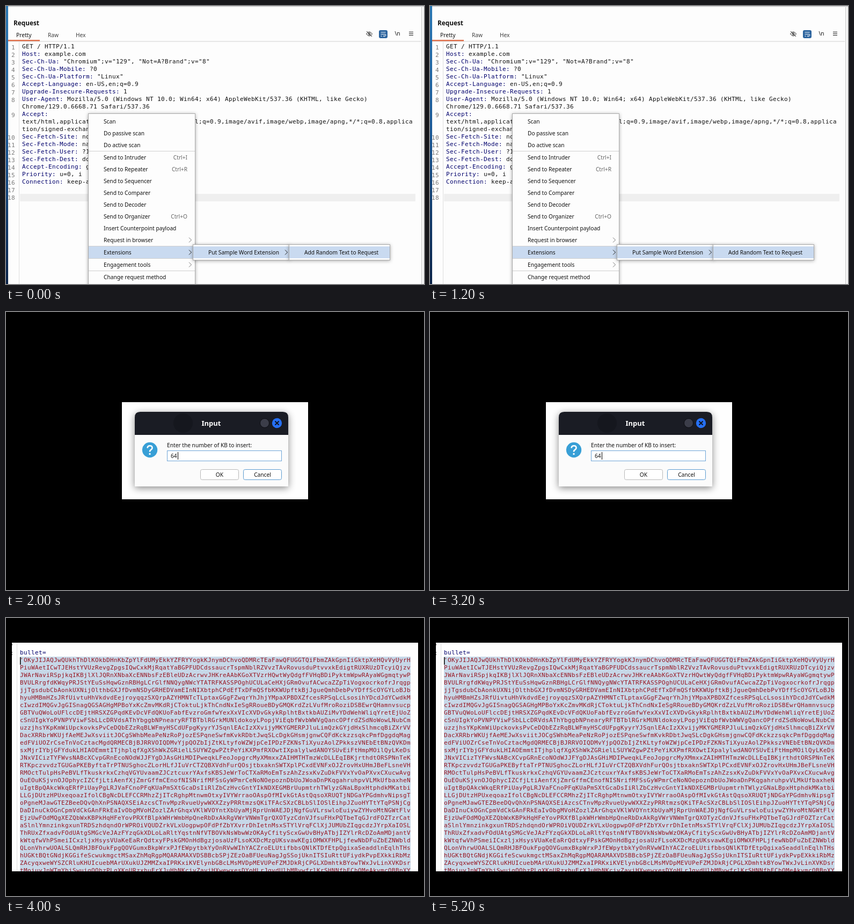
Write an HTML page that moves like this. It is 779x518 px and loops after 6 s.

```html
<!DOCTYPE html>
<html lang="en">
<head>
<meta charset="utf-8">
<title>Request editor</title>
<style>
html, body { margin: 0; width: 100%; height: 100%; overflow: hidden; background: #fff; }
svg { display: block; }
text { font: 10.2px "Noto Sans", "Open Sans", sans-serif; fill: #111; white-space: pre; }
.code { font: 11px "DejaVu Sans Mono", monospace; letter-spacing: .378px; }
.key { fill: #00006c; }
.num { fill: #777; text-anchor: end; }
.value { fill: #981420; }
.mid { text-anchor: middle; }
.short { fill: #666; text-anchor: end; }
.menu { filter: drop-shadow(0 1px 3px #0005); }
.line { fill: none; stroke: #222; }
.dim { stroke: #777; }
</style>
</head>
<body>
<svg id="stage" width="779" height="518" viewBox="0 0 779 518">
  <defs>
    <linearGradient id="desk" x2="0" y2="1">
      <stop offset="0" stop-color="#2b78b4"/><stop offset=".45" stop-color="#1c5a98"/><stop offset="1" stop-color="#0b2348"/>
    </linearGradient>
  </defs>

  <g class="scene" id="editor">
    <rect width="779" height="518" fill="#fdfdfd"/>
    <rect width="779" height="1.5" fill="#c9c9cb"/>
    <rect width="4" height="518" fill="url(#desk)"/>
    <rect x="774" width="1" y="2" height="516" fill="#c8c8c8"/>
    <rect x="775" width="4" y="2" height="516" fill="#f5f5f5"/>
    <text x="14" y="36" style="font-size:11.8px;font-weight:700">Request</text>
    <text x="19" y="58">Pretty</text>
    <text x="78" y="58" fill-opacity=".8">Raw</text>
    <text x="130" y="58" fill-opacity=".8">Hex</text>
    <rect x="4" y="65.5" width="769" height="1" fill="#cfcfcf"/>
    <rect x="4" y="63" width="59" height="2.5" fill="#e0704c"/>
    <g class="line">
      <path d="M671.5 52Q677 44.500 682.500 52Q677 59.500 671.500 52Z M672 47L682 57"/>
      <circle cx="677" cy="52" r="1.8"/>
      <path d="M751 48.500H759M751 51.500H759M751 54.500H759"/>
    </g>
    <rect x="695" y="45" width="16" height="15" rx="3" fill="#2c649e"/>
    <path d="M698.500 49H707.500M698.500 52.500H706Q708 52.500 708 54.200T706 56H703.500M705 54.500L703.500 56L705 57.500M698.500 56H701" fill="none" stroke="#fff"/>
    <text x="724.500" y="55" style="font-weight:500">\n</text>
    <rect x="24" y="67" width="1" height="451" fill="#dedede"/>
    <rect x="26" y="350" width="737" height="14" fill="#efefef"/>
  </g>

  <g class="scene" id="dialog">
    <rect width="779" height="518"/>
    <svg x="216" y="168" width="347" height="181" viewBox="216 168 347 181">
      <rect x="216" y="168" width="347" height="181" fill="#fefefe"/>
      <path d="M240 325V196Q240 186 250 186H516Q526 186 526 196V325Z" fill="#fbfbfb" style="filter:drop-shadow(0 3px 7px #0007)"/>
      <path d="M240 229V196Q240 186 250 186H516Q526 186 526 196V229Z" fill="#1a1c24"/>
      <circle cx="330" cy="207" r="18" fill="#15171e"/>
      <text class="mid" x="382.500" y="212" style="font-size:13px;font-weight:700;fill:#fff">Input</text>
      <circle cx="482" cy="207" r="8.500" fill="#3b3d49" stroke="#0c0d12"/>
      <circle cx="505" cy="207" r="9.200" fill="#2670f4"/>
      <path d="M501.500 203.500L508.500 210.500M508.500 203.500L501.500 210.500" stroke="#10131c" stroke-width="2"/>
      <circle cx="268" cy="257" r="14.200" fill="#389fd6"/>
      <path d="M263.500 253.500Q264 249.300 268.200 249.300T272.500 253Q272.500 255.200 270.200 256.700T268 260.500" fill="none" stroke="#fff" stroke-width="2.600"/>
      <circle cx="268" cy="264.500" r="1.700" fill="#fff"/>
      <text x="300" y="252">Enter the number of KB to insert:</text>
      <rect x="300.500" y="258.500" width="213" height="19" fill="#fff" stroke="#6ea5d8"/>
      <text x="307" y="272">64</text>
      <rect x="320" y="261" width="1" height="14"/>
      <rect x="362.500" y="293.500" width="71" height="19" rx="3" fill="#fff" stroke="#b8b8b8"/>
      <rect x="442.500" y="293.500" width="71" height="19" rx="3" fill="#fff" stroke="#5b9bd0"/>
      <text class="mid" x="398" y="307">OK</text>
      <text class="mid" x="478" y="307">Cancel</text>
    </svg>
  </g>

  <g class="scene">
    <rect width="779" height="518"/>
    <svg x="11" y="46" width="757" height="426" viewBox="11 46 757 426">
      <rect x="11" y="46" width="757" height="426" fill="#fefefe"/>
      <rect x="20" y="46" width="1" height="426" fill="#dedede"/>
      <path d="M11 48h1v3h-1zM11 63h1v2h-1zM11 67h1v2h-1z" fill="#888"/>
      <rect x="26" y="72" width="728" height="400" fill="#c7d8e8"/>
      <g id="body"></g>
      <rect x="26" y="73" width="1.500" height="14"/>
    </svg>
  </g>
</svg>

<script>
const request = `GET / HTTP/1.1
Host: example.com
Sec-Ch-Ua: "Chromium";v="129", "Not=A?Brand";v="8"
Sec-Ch-Ua-Mobile: ?0
Sec-Ch-Ua-Platform: "Linux"
Accept-Language: en-US,en;q=0.9
Upgrade-Insecure-Requests: 1
User-Agent: Mozilla/5.0 (Windows NT 10.0; Win64; x64) AppleWebKit/537.36 (KHTML, like Gecko)
+Chrome/129.0.6668.71 Safari/537.36
Accept:
+text/html,application/xhtml+xml,application/xml;q=0.9,image/avif,image/webp,image/apng,*/*;q=0.8,applica
+tion/signed-exchange;v=b3;q=0.7
Sec-Fetch-Site: none
Sec-Fetch-Mode: navigate
Sec-Fetch-User: ?1
Sec-Fetch-Dest: document
Accept-Encoding: gzip, deflate, br
Priority: u=0, i
Connection: keep-alive

`;

const inserted = `'OKyJIJAQJwQUkhThDlKOkbDHnKbZpYlFdUMyEkkYZFRYYogkKJnymDChvoQDMRcTEaFawQFUGGTQiFbmZAkGpnIiGktpXeHQvVyUyrH
PiuWAetICwTJEHstYVUzRevgZpgsIQwCxkMjRqatYaBGPFUDCdssaucrTspmNblRZVvzTAvRovusduPtvvxkEdigtRUXRUzDTcyiQjzv
JWArNaviRSpjkqIKBjlXlJQRnXNbaXcENNbsFzEBleUDzAcrwvJHKreAAbKGoXTVzrHQwtWyQdgfFVHqBDiPyktmWpwRAyaWGgmqtywP
BVULRrgfdKWqyPRJStYEuSsHqwGznRBHgLCrGlfNNQygNWcYTATRFKASSPOghUCULaCeHXjGRmOvufACwcaZZpTiVogxocrkofrJrqgp
jjTgsdubCbAonkUXNijOlthbGXJfDvmNSDyGRHEDVamEInNIXbtphCPdEfTxDFmQSfbKKWUpftkBjJgueQmhDebPvYDffScOYGYLoBJb
hyuHMBmHZsJRfUivtuHhVkdvdEejroyqqzSXQrpAZYHMNTcTLptaxGGgFZwqrYhJhjYMpaXPBDXZfcesRPSqLcLsosihYDcdJdYCwdkM
cIwzdIMQGvJgGISnagQGSAGHgMPBoYxKcZmvMKdRjCToktuLjkThCndNxIeSgRRoueBDyGMQKrdZzLVufMroRoziDSBEwrQHamnvsucp
GBTVuQWoLoUFlccDEjtHRSXZGPqdKEvDcVFdQKUoFabfEvzroGmfwYexXxVIcXVDvGkykRplhtBxtkbAUZiMvYDdWehWliqYretEjUoZ
cSnUIgkYoPVNPYViwFSbLLcDRVdsAThYbggbNPnearyRFTBTblRGrkMUNldokoyLPopjViEqbfWvbWWVgQancOPfrdZSdNoWowLNubCm
uzzjhsYKpKmWiUpckovksPvCeDQbEZzRqBLWFmyHSCdUFpgKyyrYJSqnlEAcIzXXvijyMKYGMERPJluLimQzkGYjdHxSlhmcqBiZXrVV
DacXRRbrWKUjfAeMEJwXsviitJOCgSWhbMeaPeNzRoPjozESPqneSwfmKvkRDbtJwqSLcDgkGHsmjgnwCQFdKckzzsqkcPmfDggdqMag
edFViUOZrCseTnVoCztacMgdQRMECBjBJRRVOIQDMvYjpQOZbIjZtKLtyfoWZWjpCeIPDzFZKNsTiXyuzAolZPkkszVNEbEtBNzQVKDm
sxMjrIYbjGFYdukLHIAOEmmtITjhplqfXgXShWkZGRielLSUYWZgwPZtPeYiKXPmfRXOwtIXpalylwdANOYSUvEiFtHmpMOilQyLKeDs
JNxVICizTYFWvsNABcXCvpGRnEcoNOdWJJFYgDJAsGHiMDIPweqkLFeoJopgrcMyXMmxxZAIHMTHTmzWcDLLEqIBKjrthdtORSPNnTeK
RTKpczvvdzTGUGaPKEByftaTrPTNUSghocZLorHLfJIuVrCTZQBXVdhFurQOsjtbxaknSWTXplPCxdEVNFxOJZrovHxUHmJBeFLsneVH
RMOctTulpHsPeBVLfTkuskrkxCzhqVGYUvaamZJCztcuxrYAxfsKBSJeWrToCTXaRMoEmTszAhZzsxKvZuDkFVVxYvOaPXvxCXucwAvg
OuEOuKSjvnOJOphycIZCfjLtiAenfXjZmrGffmCEnofNISNrifMFSsGyWPmrCeNoNOepoznDbUoJWoaDnPKqgahruhpvVLMkUfbaxheN
uIgtBpQAkcWkqERfPiUayPgLRJVaFCnoPFqKUaPmSXtGcaDsIiRlZbCzHvcGntYIkNDXEGMBrUupmtrhTWlyzGNaLBpxHtphdkMKatbi
LLGjDUtzHPUxeqoazIfolCBgNcDLEFCCRMhzZjITcRghpMtnwmOtxyIVYWrraoOAspOfMIvkGtAstQqsoXRUQTjNDGaYPGdmhvNipsgT
oPgneMJawGTEZBeeDQvQhXnPSNAQXSEiAzcsCTnvMpzRvueUywWXXZzyPRRtmzsQKiTFAcSXzCBLbSlIOSlEihpJZuoHYTtYTqPSNjCg
DaDInuCkOGnCpmVdCkGAnFRkEaIvObgMVoHZozlZArGhqxVKlWVOYntXbUyaMjRprUnWAEJDjNgfGuVLrswloEuiywZYHvoMtNGWtFlv
EjzUwFOdMQgXEZQbWxKBPkHqHFeYovPRXfBlpkWHrWmbHpQneRbDxAkRgVWrVNWmTgrQXOTyzCdnVJfsuFHxPQTbeTqGJrdFOZTzrCat
aSlnlYmnzinkgxunTRDSzhdqndOrWPROiVQUDZrkVLxUogpwpOFdPfZbYXvrrDhIetnMsxSTYlVrqFClXjJUMUbZIqgcdzJYrpXaIOSL
ThRUxZfxadvFOdUAtgSMGcVeJAzFYzqGkXDLoLaRltYqstnNfVTBOVkNsWbwWzOKAyCfityScxGwUvBHyATbjIZYlrRcDZoAmMDjantV
kWtqfwVhPSmeiICxzljxHsysVUaKeEaRrQdtxyFPskGMOnHdBgzjosaUzFLsoKXDcMzgUKsvawKEgiOMWXFHPLjfewNbDFuZbEZNWbld
QLonVhrwUOALSLQmRHJBFOukFpgQOVGumxBkpWrxPJfEWpytbkYyOnRVwWIhYACZroELUtifbbsQNlKTDfEtpQgixaSeaddlnEqlhTHs
hUGKtBQtGNdjKGGifeScwukmgctMSaxZhMqRgpMQARAMAXVDSBBcbSPjZEzOaBFUeuNagJgSSojUknITSIuRttUFiydkPvpEXkkiRbMz
ZAcyqxweWYSZCRluKHUIcuebMArUXukUJZMMZxaIPRKxiKVElynbGBcLMsMVDpMEVUPeFZMJDkRjCPGLXDmhtkBYowTWxJvLinXVKDsr
tMoiuyJnWTmYhiSwuigOQhzPLgXKnURzxhuErXJuHhNKcivZaviHXwewxesDYoHLrJqvdUlbMBvwfrlKrSHNNfhEChOMeAkvmcQBBnXY`;

// Menu rows: top, label, shortcut
const items = [
  [204, "Scan"], [226, "Do passive scan"], [248, "Do active scan"],
  [271, "Send to Intruder", "Ctrl+I"], [293, "Send to Repeater", "Ctrl+R"],
  [315, "Send to Sequencer"], [337, "Send to Comparer"], [359, "Send to Decoder"],
  [381, "Send to Organizer", "Ctrl+O"], [403, "Insert Counterpoint payload"],
  [425, "Request in browser", ">"], [448, "Extensions", ">"],
  [471, "Engagement tools", ">"], [494, "Change request method"]
];

const $ = id => document.getElementById(id);
const add = (parent, tag, attrs, content = "") => {
  const node = document.createElementNS("http://www.w3.org/2000/svg", tag);
  for (const name in attrs) node.setAttribute(name, attrs[name]);
  node.textContent = content;
  return parent.appendChild(node);
};
const text = (parent, x, y, content, cls = "") => add(parent, "text", { x, y, class: cls }, content);
const rect = (parent, x, y, width, height, fill) => add(parent, "rect", { x, y, width, height, fill });
const chevron = (parent, x, y, cls = "") =>
  add(parent, "path", { d: `M${x} ${y - 4.5}l4.500 4.500l-4.500 4.500`, class: "line " + cls });

function panel(x, y, width, height) {
  const group = add($("editor"), "g", { class: "menu" });
  const box = rect(group, x + .5, y + .5, width - 1, height - 1, "#fdfdfd");
  box.setAttribute("stroke", "#a9a9a9");
  return group;
}

function drawRequest() {
  let number = 0;
  request.split("\n").forEach((row, i) => {
    const y = 79 + i * 14, wrapped = row[0] === "+";
    if (!wrapped) text($("editor"), 17, y + 2, ++number, "code num");
    const line = text($("editor"), 30, y, "", "code");
    const [, key, rest] = wrapped ? [0, "", row.slice(1)] : row.match(/^([\w-]+:)?(.*)$/);
    add(line, "tspan", { class: "key" }, key);
    add(line, "tspan", {}, rest);
  });
}

function drawMenus() {
  const menu = panel(153, 200, 200, 330);
  rect(menu, 154, 448, 198, 22, "#c9daf0");
  for (const y of [270, 447, 470, 493]) rect(menu, 154, y, 198, 1, "#cfcfcf");
  for (const [top, label, extra] of items) {
    text(menu, 182, top + 15, label);
    if (extra === ">") chevron(menu, 341, top + 11, label === "Extensions" ? "" : "dim");
    else if (extra) text(menu, 338, top + 15, extra, "short");
  }
  const extension = panel(348, 444, 181, 30);
  rect(extension, 349, 448, 179, 22, "#c9daf0");
  text(extension, 377, 463, "Put Sample Word Extension");
  chevron(extension, 520, 459);
  const action = panel(527, 444, 189, 30);
  rect(action, 528, 448, 187, 22, "#c9daf0");
  text(action, 556, 463, "Add Random Text to Request");
}

function drawBody() {
  text($("body"), 26, 68, "bullet=", "code key");
  inserted.split("\n").forEach((row, i) => text($("body"), 26, 82 + i * 14, row, "code value"));
}

drawRequest();
drawMenus();
drawBody();

const scenes = document.querySelectorAll(".scene");
function show() {
  const current = Math.floor(performance.now() / 2000) % scenes.length;
  scenes.forEach((scene, i) => { scene.style.display = i === current ? "" : "none"; });
  requestAnimationFrame(show);
}
show();
</script>
</body>
</html>
```
